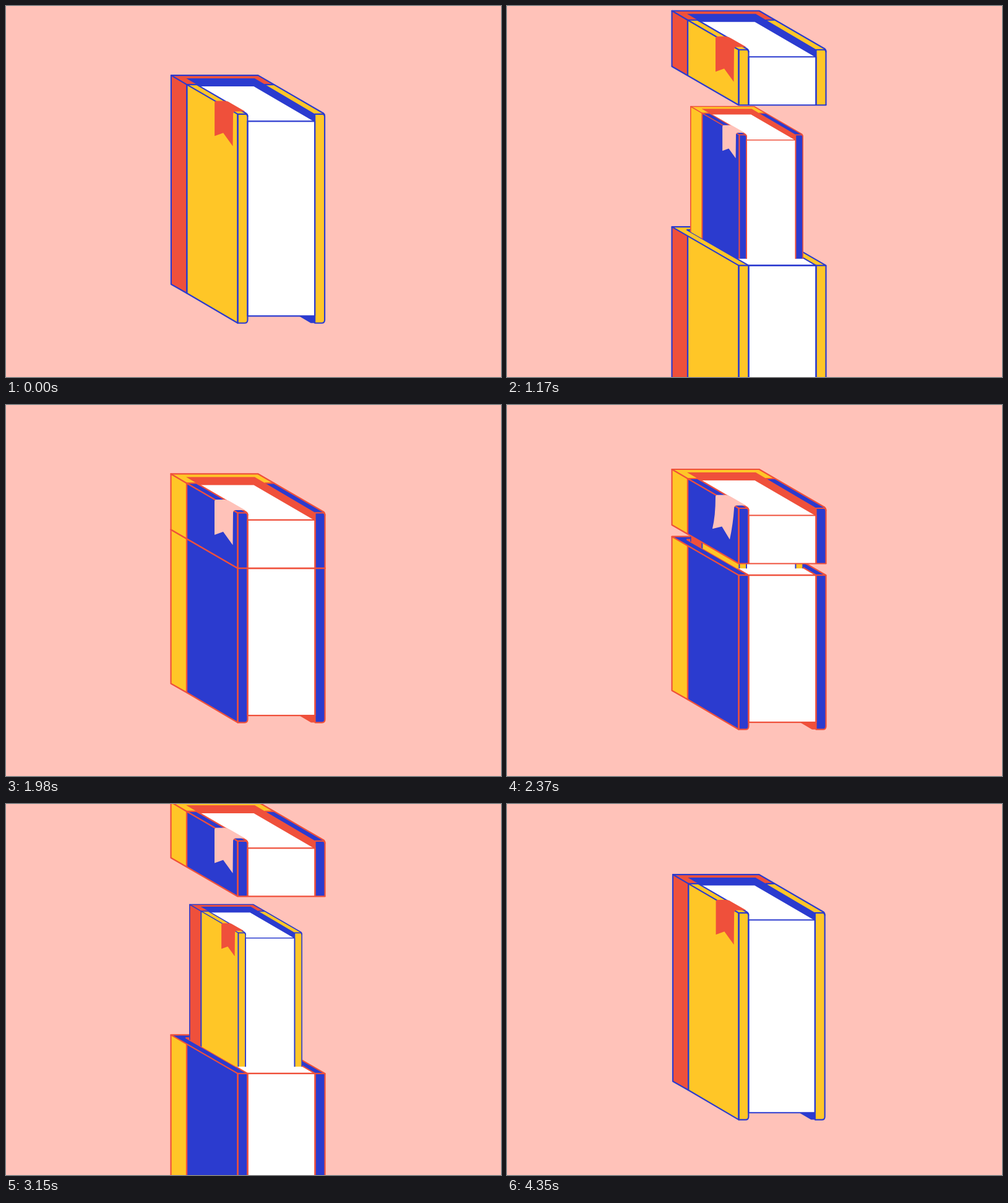
These frames come from a looping animation (800 by 600 pixels, 4380 ms). An HTML page with a canvas:

```html
<!DOCTYPE html>
<html lang="en">
<head>
<meta charset="utf-8">
<title>Book in a book</title>
<style>
  html, body { margin: 0; width: 100%; height: 100%; overflow: hidden; background: #ffc2b9; }
  canvas { display: block; }
</style>
</head>
<body>
<canvas id="stage" width="800" height="600"></canvas>
<script>
const ctx = document.getElementById('stage').getContext('2d');

const PINK = '#ffc2b9', RED = '#ef503b', BLUE = '#2b3bcf', YELLOW = '#ffc627', WHITE = '#fff';
const warm = { cover: YELLOW, spine: RED, ink: BLUE, ribbon: RED };
const cool = { cover: BLUE, spine: YELLOW, ink: RED, ribbon: PINK };

const LOOP = 4380, SECOND = 1946;   // the second opening starts at SECOND
const DIP = 465, DIP_LEAD = 435;    // squeeze before an opening
const SMALL = 0.728, GROW_FROM = 1200, GROW_TO = 1500;
const MAX_LIFT = 400;               // both halves are off the stage by then
const PIVOT = [378, 299];

const path = d => new Path2D(d);
const shape = {
  top: path('M266.5 111.5H407.5L515 174H374.5Z'),
  topSpine: path('M266.5 111.5H407.5L433.5 126.5H292Z'),
  well: path('M291 116.5H402L499.5 174V186.5H390.5V174.5Z'),
  pagesTop: path('M313 129.5H400.5L498.5 186.5H390.5V174.5Z'),
  pages: path('M390.5 186H499.5V502H390.5Z'),
  foot: path('M473.5 502H499.5V513.5H493Z'),
  spine: path('M266.5 111.5L292 126.5V465L266.5 450.5Z'),
  cover: path('M292 126.5L374.5 174.5V513.5L292 465Z'),
  frontEdge: path('M374.5 174.5H387Q390.5 174.5 390.5 178.5V508.5Q390.5 513.5 385.5 513.5H374.5Z'),
  backEdge: path('M499.5 174.5H512Q515.5 174.5 515.5 178.5V508.5Q515.5 513.5 510.5 513.5H499.5Z'),
  topLines: path('M266.5 111.5H407.5L513.5 173Q515.5 174.5 515.5 178 M292 126.5H308L387 172.5Q390.5 174.5 390.5 178 M419 126.5H433.5'),
  cutTop: path('M266.5 201.5H407.5L515.5 264H374.5Z'),
  cutPages: path('M291 206.5H402L499.5 264H390.5Z'),
  cutLine: path('M266.5 201.5L374.5 264H515.5'),
  above: path('M0 -900H800V264H374.5L250 192H0Z'),
  below: path('M0 192H250L374.5 264H800V900H0Z'),
  inside: path('M0 -900H800V253H371.5L250 182.5H0Z')
};

function fill(name, color) {
  ctx.fillStyle = color;
  ctx.fill(shape[name]);
}

function line(...names) {
  for (const n of names) ctx.stroke(shape[n]);
}

function setPen(pal) {
  ctx.strokeStyle = pal.ink;
  ctx.lineWidth = 2.2;
  ctx.lineJoin = ctx.lineCap = 'round';
}

function drawRibbon(color, b) {
  ctx.fillStyle = color;
  ctx.fill(path(`M337 156Q337 153 340 153H354Q359 153.5 363 156.5L386.5 170H371Q367 170 367 175
    Q${366.7 - 3 * b} 199 ${366.5 - 16 * b} ${226.5 - 4 * b}
    L${351 - 9 * b} ${205 - 2.5 * b}L${337 - 12.5 * b} ${210 - 5.5 * b}Q337 187 337 156Z`));
}

function drawBook(pal, bend = 0) {
  setPen(pal);
  fill('top', pal.cover);
  fill('topSpine', pal.spine);
  fill('well', pal.ink);
  fill('pagesTop', WHITE);
  fill('pages', WHITE);
  fill('foot', pal.ink);
  fill('spine', pal.spine);
  fill('cover', pal.cover);
  fill('frontEdge', pal.cover);
  fill('backEdge', pal.cover);
  line('topLines', 'pages', 'spine', 'cover', 'frontEdge', 'backEdge');
  drawRibbon(pal.ribbon, bend);
}

function drawLower(pal) {
  ctx.save();
  ctx.clip(shape.below);
  drawBook(pal);
  ctx.restore();
  setPen(pal);
  fill('cutTop', pal.cover);
  fill('cutPages', WHITE);
  line('cutTop', 'cutPages');
}

function drawLid(pal, bend) {
  ctx.save();
  ctx.clip(shape.above);
  drawBook(pal, bend);
  ctx.restore();
  setPen(pal);
  line('cutLine');
}

function shifted(dy, draw) {
  ctx.save();
  ctx.translate(0, dy);
  draw();
  ctx.restore();
}

function scaled(s, draw) {
  ctx.save();
  ctx.translate(...PIVOT);
  ctx.scale(s, s);
  ctx.translate(-PIVOT[0], -PIVOT[1]);
  draw();
  ctx.restore();
}

const clamp = x => Math.min(1, Math.max(0, x));
const smooth = x => x * x * (3 - 2 * x);
const bump = x => (1 - Math.cos(2 * Math.PI * clamp(x))) / 2;
const dip = ms => 0.09 * bump(ms / DIP);

function lift(ms) {
  const s = ms / 1000;
  return Math.min(MAX_LIFT, 39.7 * s ** 2 + 22.4 * s ** 5);
}

// One opening: the outer book splits and the inner one takes its place.
function drawOpening(t, length, outer, inner) {
  if (t < DIP - DIP_LEAD) {
    scaled(1 - dip(t + DIP_LEAD), () => drawBook(outer));
    return;
  }
  const up = lift(t), down = 1.5 * up;
  const grown = smooth(clamp((t - GROW_FROM) / (GROW_TO - GROW_FROM)));
  const size = SMALL + (1 - SMALL) * grown - dip(t - length + DIP_LEAD);

  shifted(down, () => drawLower(outer));
  ctx.save();
  ctx.translate(0, down);
  ctx.clip(shape.inside);
  ctx.translate(0, -down);
  scaled(size, () => drawBook(inner));
  ctx.restore();
  shifted(-up, () => drawLid(outer, bump((t - 240) / 840)));
}

function render(t) {
  ctx.fillStyle = PINK;
  ctx.fillRect(0, 0, 800, 600);
  if (t < SECOND) drawOpening(t, SECOND, warm, cool);
  else drawOpening(t - SECOND, LOOP - SECOND, cool, warm);
}

const start = performance.now();
function tick() {
  render((performance.now() - start) % LOOP);
  requestAnimationFrame(tick);
}
tick();
</script>
</body>
</html>
```
